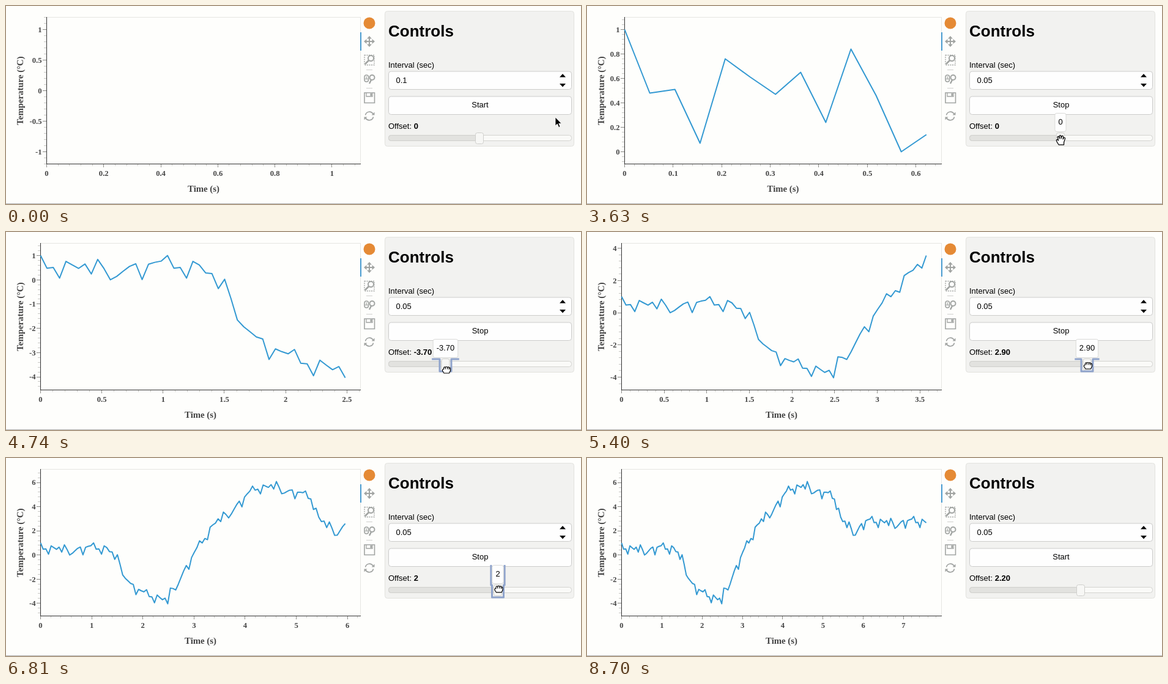
Recreate the animation shown at these times as an HTML page. Size 940 px wide and 324 px high, loop 8730 ms.

```html
<!DOCTYPE html>
<html lang="en">
<head>
<meta charset="utf-8">
<title>Live temperature plot</title>
<style>
  html, body { margin: 0; width: 940px; height: 324px; overflow: hidden; background: #fefefc; }
  svg { display: block; font: 13px "Liberation Sans", Arial, sans-serif; fill: #000; }
  .plot text { font: bold 12.67px "Liberation Serif", "Times New Roman", serif; fill: #444; }
  .plot text.title { font-size: 14.8px; }
  .mid { text-anchor: middle; }
  .end { text-anchor: end; }
  .crisp { shape-rendering: crispEdges; }
  .icon { fill: none; stroke: #a1a4a2; stroke-width: 1.6; }
  .icon .solid { fill: #a1a4a2; stroke: none; }
  .box { fill: #fefefe; stroke: #cccccb; }
  .cursor { fill: #fff; stroke: #000; stroke-width: 1.2; stroke-linejoin: round; }
</style>
</head>
<body>
<svg width="940" height="324" viewBox="0 0 940 324">
  <path class="crisp" d="M0 323.5H940" stroke="#b0b0b0"/>

  <g class="plot">
    <path id="frame" class="crisp" fill="none" stroke="#e5e5e2"/>
    <path id="minor" class="crisp" stroke="#c8c8c4"/>
    <path id="major" class="crisp" stroke="#8c8c88"/>
    <path id="axes" class="crisp" fill="none" stroke="#333"/>
    <polyline id="curve" fill="none" stroke="#3399d2" stroke-width="2" stroke-linejoin="round"/>
    <g id="labels"></g>
    <text id="xTitle" class="title mid" y="304">Time (s)</text>
    <text class="title mid" transform="translate(27.5 138.5) rotate(-90)">Temperature (°C)</text>
  </g>

  <circle cx="594" cy="28" r="9.5" fill="#e58a35"/>
  <path d="M580 43V73" stroke="#4a9cd0" stroke-width="2"/>
  <g class="icon">
    <path d="M586 58H602M594 50V66" stroke-width="2"/>
    <path class="solid" d="M594 49l4 4.500h-8zM594 67l4-4.500h-8zM585 58l4.500-4v8zM603 58l-4.500-4v8z"/>
    <rect x="586" y="80.500" width="16" height="16" stroke-dasharray="2 1.500" stroke-width="1.300"/>
    <circle cx="596.500" cy="85.500" r="4.500" fill="#fefefc" stroke-width="2"/>
    <path d="M593 89l-6 6" stroke-width="2.600"/>
    <path d="M589 104.500h10M589 134.500h10" stroke="#d0d0ce" stroke-width="1"/>
    <rect x="586" y="113" width="6.500" height="11" rx="3.200"/>
    <path d="M589.200 115v4M586 119.500h6.500" stroke-width="1.200"/>
    <circle cx="598.500" cy="117" r="4" stroke-width="2"/>
    <path d="M597 121l-3 6" stroke-width="2.400"/>
    <path d="M586 142h16.500v16.500H586z"/>
    <path d="M589 142v6h10v-6" stroke-width="1.300"/>
    <path class="solid" d="M595.500 143h2.500v4h-2.500z"/>
    <path d="M587.500 178.500a6.800 6.800 0 0 1 12.500-2M600.500 181.500a6.800 6.800 0 0 1-12.500 2" stroke-width="1.700"/>
    <path class="solid" d="M597.500 178.500h5v-5zM590.500 181.500h-5v5z"/>
  </g>

  <rect x="619.5" y="8.500" width="309" height="221" rx="4" fill="#f2f2f0" stroke="#e2e2de"/>
  <text x="625" y="50" font-size="26" font-weight="bold">Controls</text>
  <text x="625" y="101">Interval (sec)</text>
  <rect id="field" class="box" x="625.5" y="107" width="299" height="29.500" rx="4"/>
  <text id="interval" x="637.500" y="126"></text>
  <path id="caret" class="crisp" d="M0 114V129" stroke="#000"/>
  <path d="M910 111l5 5.500h-10zM910 132.500l5-5.500h-10z"/>
  <rect class="box" x="625.5" y="148" width="299" height="29.500" rx="4"/>
  <text id="button" class="mid" x="775" y="166"></text>
  <text x="625" y="201" xml:space="preserve">Offset: <tspan id="offset" font-weight="bold"></tspan></text>
  <rect x="625.5" y="211.500" width="299" height="9" rx="4" fill="#fafaf8" stroke="#d3d3cf"/>
  <rect id="fill" x="625.5" y="211.500" height="9" rx="4" fill="#e2e2df" stroke="#d0d0cc"/>
  <path id="ring" fill="none" stroke="#90a4cc" stroke-width="3" stroke-linejoin="round"/>
  <rect id="handle" y="207.500" width="13" height="18" rx="3" fill="#f7f7f5" stroke="#cfcfcc"/>
  <g id="tip">
    <rect id="tipBox" y="175.500" height="30" rx="3" fill="#fefefe" stroke="#dadad8"/>
    <text id="tipText" class="mid" y="194"></text>
  </g>

  <g id="cursor" class="cursor">
    <path id="arrow" d="M0 0V14L3.300 11L5.700 16.500L8 15.500L5.700 10.300H10z" fill="#000" stroke="#fff" stroke-width=".8"/>
    <path id="beam" d="M-3-7Q0-7 0-5Q0-7 3-7M0-5V5M-3 7Q0 7 0 5Q0 7 3 7M-1.500 1.500H1.500" fill="none"/>
    <path id="open" d="M-3.500 8L-7 2Q-8-.500-5.500-.500L-4 1L-5.500-4Q-5.300-6.500-3.500-5.500L-2.300-2V-6.500Q-1-8.500 .300-6.500V-2L1.500-6Q3-7.500 4-5.500L3.500-1L5-3.500Q7-4.500 7-2L5 4V8z"/>
    <path id="grab" d="M-4 6L-6.500 2Q-7-.500-4.500-.500V-2.500Q-4-5-1.800-3.500Q0-5.500 1.500-3.500Q3.500-5 4.300-2.800Q6.500-3.500 6.500-1V2L4.500 6zM-1.800-3V-.500M1.500-3V-.500M4.300-2.500V0"/>
    <path id="point" d="M-3 9L-6.500 4Q-7.500 1.500-5 1.800L-3 3.500V-5.500Q-1.800-7.500-.500-5.500V0Q1-1.500 2 .300Q3.500-.800 4.300 1Q6.500 .300 6.500 2.500V5L5 9z"/>
  </g>
</svg>
<script>
const LOOP = 8730, TICK = 30;
const START = 3228, STOP = 7770;        // button clicks, ms
const GRAB = 3960, DROP = 6860;         // slider drag, ms
const MS_PER_SEC = 600, STEP = .0518;   // playback rate; plotted seconds per sample
const RIGHT = 579, TOP = 18, BOTTOM = 258;
const $ = id => document.getElementById(id);

// Sensor noise, repeated for the whole run
const noise = [1, .48, .51, .07, .76, .61, .47, .65, .24, .84, .46, 0, .14, .35, .55, .66, .01, .64, .72, .77];

// [plotted seconds, slider value]
const drag = [
  [1.3, 0], [1.5, -.8], [1.76, -2.9], [2, -3.8], [2.49, -4.28], [2.52, -3.7], [3.4, 2.1],
  [4.2, 4.9], [4.6, 5.26], [4.82, 4.9], [5.3, 4.1], [5.45, 2.4], [5.8, 1.5], [6.05, 2.2]
];

// [ms, x, y]
const moves = [
  [150, 898, 182], [650, 872, 124], [2100, 872, 124], [2520, 870, 134], [3030, 802, 165],
  [3270, 802, 165], [3570, 775, 219], [4740, 721, 225], [6120, 849, 210], [DROP, 808, 214],
  [7350, 812, 164], [7800, 812, 164], [8100, 840, -20]
];

function along(keys, t, ease = k => k) {
  if (t <= keys[0][0]) return keys[0].slice(1);
  for (let i = 1; i < keys.length; i++) {
    const [a, b] = [keys[i - 1], keys[i]];
    if (t < b[0]) {
      const k = ease((t - a[0]) / (b[0] - a[0]));
      return a.slice(1).map((v, j) => v + (b[j + 1] - v) * k);
    }
  }
  return keys[keys.length - 1].slice(1);
}
const smooth = k => k * k * (3 - 2 * k);
const offsetAt = sec => along(drag, sec)[0];
const sample = i => offsetAt(i * STEP) + noise[i % noise.length];
const set = (id, attrs) => { for (const a in attrs) $(id).setAttribute(a, attrs[a]); };
const show = (id, on) => { $(id).style.display = on ? "" : "none"; };
const between = (t, a, b) => t >= a && t < b;

function tickStep(range) {
  const unit = 10 ** Math.floor(Math.log10(range / 6));
  const miss = s => Math.abs(6 - range / s);
  return [1, 2, 5, 10].map(m => m * unit).reduce((a, b) => miss(b) < miss(a) ? b : a);
}
function ticks(lo, hi) {
  const small = tickStep(hi - lo) / 5, major = [], minor = [];
  for (let k = Math.ceil(lo / small - 1e-6); k * small <= hi + 1e-9; k++)
    (k % 5 ? minor : major).push(+(k * small).toFixed(6));
  return { major, minor };
}
const labelWidth = s => 12.67 * [...s].reduce((w, c) => w + ({ ".": .25, "-": .333 }[c] || .5), 0);

let drawn = -1;
function drawPlot(count) {
  if (count === drawn) return;
  drawn = count;
  const data = Array.from({ length: count }, (_, i) => sample(i));
  let lo = Math.min(...data), hi = Math.max(...data);
  if (count < 2) {
    const centre = data[0] || 0;
    lo = centre - 1;
    hi = centre + 1;
  }
  const pad = (hi - lo) / 10;
  lo -= pad; hi += pad;
  const xEnd = count > 1 ? (count - 1) * STEP * 1.05 : 1.1;
  const xt = ticks(0, xEnd), yt = ticks(lo, hi);
  const left = Math.floor(46 + Math.max(...yt.major.map(v => labelWidth(String(v)))));
  const X = v => left + .5 + (RIGHT - left) * v / xEnd;
  const Y = v => BOTTOM + .5 - (BOTTOM - TOP) * (v - lo) / (hi - lo);
  const marks = (xs, ys, size) =>
    xs.map(v => `M${X(v)} ${BOTTOM}v${size}`).join("") +
    ys.map(v => `M${left} ${Y(v)}h${-size}`).join("");

  set("frame", { d: `M${left}.5 ${TOP}.5H${RIGHT}.5V${BOTTOM}.5` });
  set("axes", { d: `M${left}.5 ${TOP}V${BOTTOM}.5H${RIGHT}.5` });
  set("minor", { d: marks(xt.minor, yt.minor, 4) });
  set("major", { d: marks(xt.major, yt.major, 6) });
  set("curve", { points: data.map((v, i) => `${X(i * STEP).toFixed(2)},${Y(v).toFixed(2)}`).join(" ") });
  set("xTitle", { x: (left + RIGHT) / 2 + .5 });
  $("labels").innerHTML =
    xt.major.map(v => `<text class="mid" x="${X(v)}" y="278">${v}</text>`).join("") +
    yt.major.map(v => `<text class="end" x="${left - 7.5}" y="${Y(v) + 4.3}">${v}</text>`).join("");
}

function drawInput(t) {
  const typed = Math.floor((t - 1320) / 210);
  const focused = between(t, 840, 3150);
  $("interval").textContent = typed < 0 ? "0.1" : "0.05".slice(0, 2 + typed);
  set("field", { style: focused ? "stroke:#70a8c8" : "" });
  set("caret", { transform: `translate(${638 + $("interval").getComputedTextLength()} 0)` });
  show("caret", focused && Math.floor((t - 780) / 300) % 2 === 1);
  $("button").textContent = between(t, START, STOP) ? "Stop" : "Start";
}

function drawSlider(t, sec) {
  const value = Math.round(offsetAt(sec) * 10) / 10 || 0;
  const text = Number.isInteger(value) ? String(value) : value.toFixed(2);
  const x = 774 + 15 * value;
  const tip = between(t, 3510, 5820) || between(t, 6150, 7020);
  $("offset").textContent = $("tipText").textContent = text;
  set("fill", { width: x - 625.5 });
  set("handle", { x: x - 6.5 });
  show("tip", tip);
  const w = tip ? $("tipText").getComputedTextLength() + 11 : 18;
  set("tipBox", { x: x - w / 2, width: w });
  set("tipText", { x });
  show("ring", between(t, GRAB, STOP));
  const half = w / 2 + 2, top = w < 30 ? 175 : 208, l = x - 9.5, r = x + 9.5;
  set("ring", { d: tip
    ? `M${x - half} ${top}V208H${l}V228H${r}V208H${x + half}V${top}`
    : `M${l} 205H${r}V228H${l}z` });
  return x;
}

function drawCursor(t, handleX) {
  let [x, y] = along(moves, t, smooth);
  const dragging = between(t, GRAB, DROP);
  if (dragging) x = handleX + 1.5;
  const shape = dragging ? "grab" : y > 205 ? "open"
    : between(y, 148, 178) ? "point" : between(y, 107, 137) ? "beam" : "arrow";
  for (const path of $("cursor").children) show(path.id, path.id === shape);
  set("cursor", { transform: `translate(${x} ${y})` });
}

const origin = performance.now();
function render() {
  const t = Math.floor((performance.now() - origin) % LOOP / TICK) * TICK;
  const sec = (Math.min(t, STOP) - START) / MS_PER_SEC;
  drawPlot(Math.max(0, Math.floor(sec / STEP) + 1));
  drawInput(t);
  drawCursor(t, drawSlider(t, sec));
  requestAnimationFrame(render);
}
render();
</script>
</body>
</html>
```
